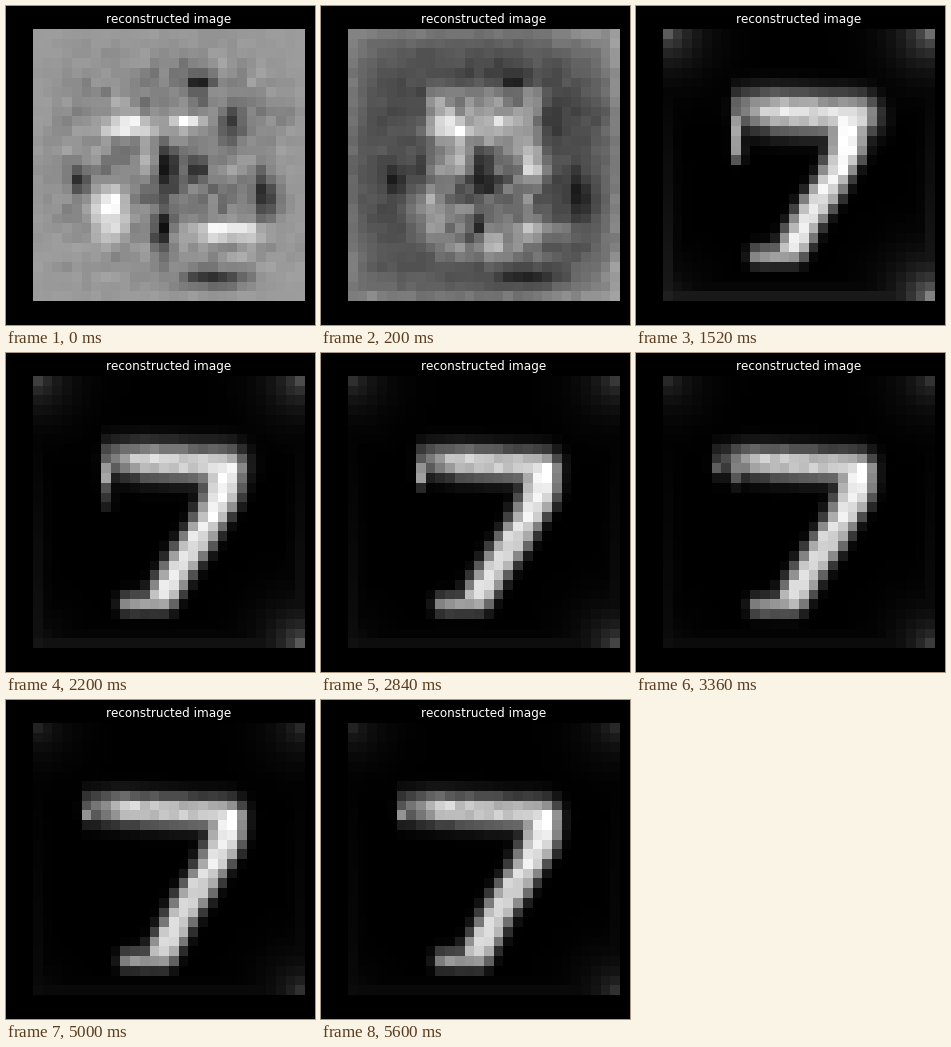
These frames come from a looping animation (309 px wide and 319 px high, 5640 ms). A matplotlib script:

```python
import numpy as np
import matplotlib.pyplot as plt
from matplotlib.animation import FuncAnimation

W, H, DPI = 309, 319, 72
FRAMES, STEP = 141, 40
N = 28
plt.rcParams["text.kerning_factor"] = 6

rng = np.random.default_rng(7)
y, x = np.mgrid[0:N, 0:N].astype(float)
edge = np.minimum(np.minimum(x, N - 1 - x), np.minimum(y, N - 1 - y))
noise = rng.normal(0, 1, (N, N))
smooth = (noise + .6 * (np.roll(noise, 1, 0) + np.roll(noise, 1, 1))) / 1.3


def spot(cx, cy, sx, sy, p=2):
    return np.exp(-np.abs((x - cx) / sx) ** p - np.abs((y - cy) / sy) ** p)


def stroke(level, width, p, *pts):
    """Soft pen line through the points."""
    dist = np.full((N, N), 99.0)
    for (x0, y0), (x1, y1) in zip(pts, pts[1:]):
        dx, dy = x1 - x0, y1 - y0
        t = np.clip(((x - x0) * dx + (y - y0) * dy) / (dx * dx + dy * dy), 0, 1)
        dist = np.minimum(dist, np.hypot(x - x0 - t * dx, y - y0 - t * dy))
    return level * np.exp(-(dist / width) ** p)


def static():
    """Grey grain with a few bright and dark patches."""
    bright = [(7.4, 18.2, 1.9, 2.4), (18.8, 20.4, 4, .9), (9.3, 9.6, 2.5, 1), (15.3, 9, 1.7, .8)]
    dark = [(13.2, 13.6, 1, 2.8), (16.2, 14, 1, 1.3), (12.8, 20, 1, 2.6), (18, 25.2, 3.2, 1),
            (20.3, 9.4, 1.2, 2), (23.4, 16.5, 1.2, 2.4), (16.8, 5, 1.6, 1), (4.3, 15, 1.1, 1.5)]
    middle = spot(13.5, 13.5, 12, 12, 4)
    img = .57 + middle * (.06 * smooth - .08)
    img += .45 * sum(spot(*s) for s in bright)
    img -= .36 * sum(spot(*s) for s in dark)
    return np.clip(img, 0, 1)


def blot():
    """Mottled block inside a glowing border."""
    box = spot(13.8, 14.5, 6.1, 9.2, 12)
    body = box * (.56 - .2 * (y > 14) - .25 * spot(13.5, 14, 2.6, 3, 4) + .08 * noise)
    for cx, cy, sx, sy in [(18.3, 13.8, 1.3, 2.2), (10.4, 10, 1.1, .9), (14, 21.9, 1.6, 1.4)]:
        body = body + .4 * spot(cx, cy, sx, sy)
    radius = np.hypot(x - 13, y - 13.5) / 13.5
    rim = .2 * np.exp(-edge / 1.6) + .5 * np.clip(radius - .95, 0, .6)
    rim *= .8 + .4 * x / N + .1 * noise
    return np.clip(np.maximum(body, rim), .02, 1)


def seven(left, foot, curl, lean, rim):
    """The digit; lean bends it towards a rounder, wider shape."""
    top = 8.2 - .4 * lean
    bar = stroke(.88, 1.53 + .5 * lean, 2, (left + .8, top), (19.5, top + .6))
    bar *= .55 + .45 * np.clip((x - left - 1) / 3, 0, 1)
    hook = stroke(.6, .7, 2, (left, 9), (left, 9 + curl))
    level = 1 - .09 * np.clip((y - 11) / 4, 0, 1)
    width = 1.62 + .25 * np.clip((14 - y) / 3, 0, 1)
    trunk = stroke(level, width, 3, (19.5 - lean, 9.4), (19.2 - .7 * lean, 12),
                   (17.4 - .5 * lean, 15.2), (15.4 - .5 * lean, 18.2), (12.9, foot - 1))
    base = stroke(.62, 1, 2, (9.4, foot), (13, foot))
    ink = np.max([bar, hook, trunk, base], axis=0) * np.where(x < left, .12, 1)
    glow = .1 * np.exp(-edge / .8) * (y / N)
    for cx, cy, a in [(0, 0, .35), (27, 0, .42), (27, 27, .5), (0, 27, .12)]:
        glow = np.maximum(glow, a * np.exp(-np.hypot(x - cx, y - cy) / 2.2))
    return np.maximum(ink * (1 + .05 * noise), rim * glow)


final = seven(left=5, foot=23.9, curl=.1, lean=0, rim=.4)
KEYS = [(0, static()),
        (14, blot()),
        (38, seven(left=7, foot=22.8, curl=3.5, lean=1, rim=1)),
        (71, seven(left=7, foot=23, curl=1.2, lean=.1, rim=.55)),
        (98, seven(left=5, foot=23.3, curl=.1, lean=0, rim=.45)),
        (125, final),
        (FRAMES, final)]


def picture(i):
    for (t0, a), (t1, b) in zip(KEYS, KEYS[1:]):
        if t0 <= i < t1:
            u = (1 - np.exp(-1.2 * (i - t0) / (t1 - t0))) / (1 - np.exp(-1.2))
            img = np.clip(a + u * (b - a), 0, None)
            return img / img.max()


fig = plt.figure(figsize=(W / DPI, H / DPI), dpi=DPI, facecolor="black")
ax = fig.add_axes([27 / W, 24 / H, 272 / W, 272 / H])
ax.axis("off")
ax.set_title("reconstructed image", color="white", fontsize=12, family="DejaVu Sans")
view = ax.imshow(picture(0), cmap="gray", vmin=0, vmax=1,
                 interpolation="nearest", aspect="auto")


def update(i):
    view.set_data(picture(i))
    return [view]


anim = FuncAnimation(fig, update, frames=FRAMES, interval=STEP, repeat=True, repeat_delay=0)
plt.show()
```
